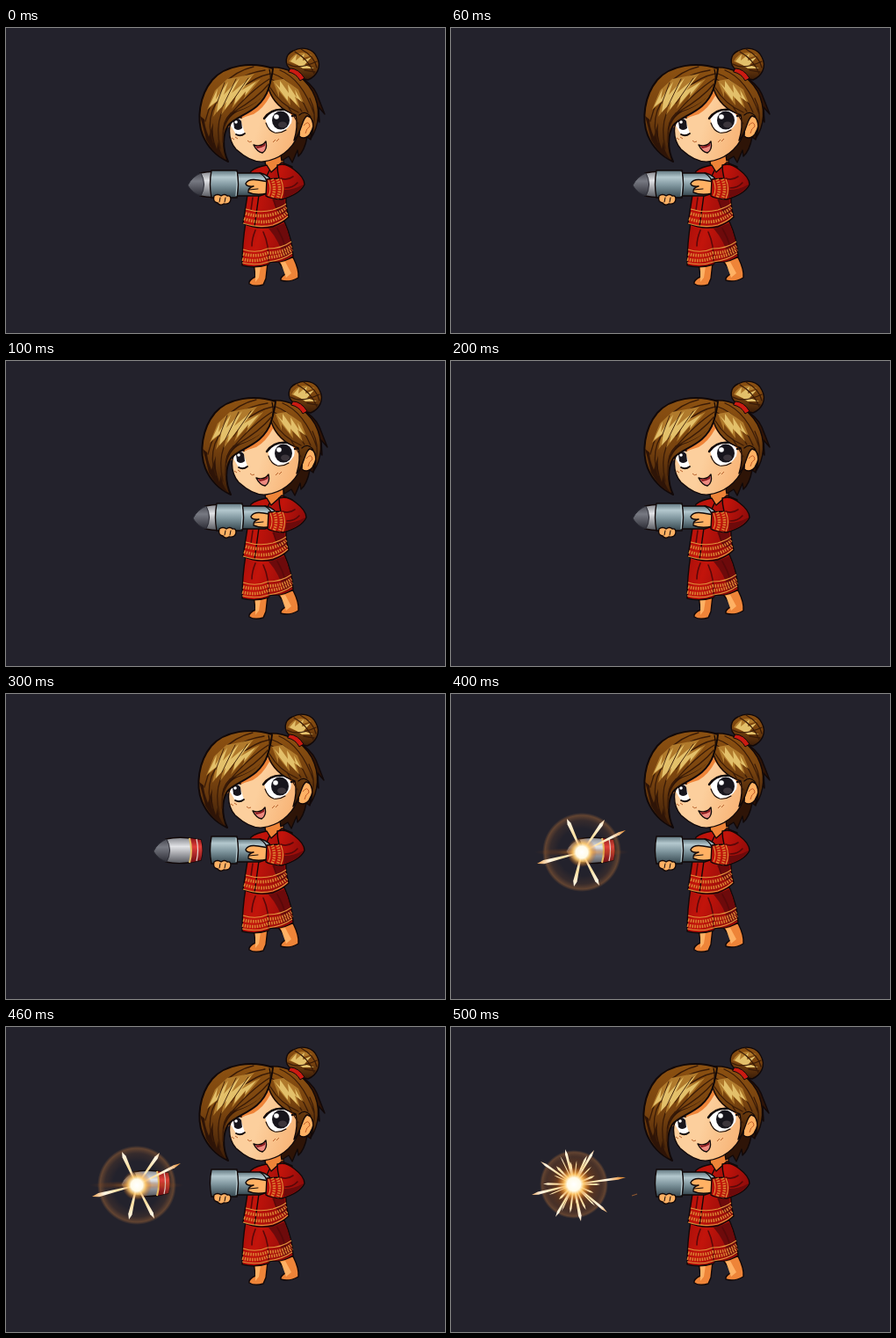
An HTML page that plays this animation: 500x347 px, repeating every 600 ms.

```html
<!DOCTYPE html>
<html lang="en">
<head>
<meta charset="utf-8">
<title>Rocket girl</title>
<style>
  html, body { margin: 0; width: 100%; height: 100%; overflow: hidden; background: #23222c; }
  svg { display: block; width: 100%; height: 100%; }
  .ink { stroke: #110808; stroke-width: 1.4; stroke-linejoin: round; stroke-linecap: round; }
  .line { fill: none; }
  .skin { fill: url(#skin); }
  .warm { fill: #ffb164; }
  .shade { fill: #ee8438; }
  .red { fill: url(#red); }
  .maroon { fill: #6d0a0b; }
  .hair { fill: url(#hair); }
  .dark { fill: #2e1407; }
  .strand { fill: none; stroke: #3a1b07; stroke-width: 1.3; stroke-linecap: round; }
  .shine { fill: #e3c06a; }
  .shine2 { fill: #b07a2c; }
  .fold { fill: none; stroke: #590809; stroke-width: 1.6; stroke-linecap: round; }
  .gold { fill: none; stroke: #e3923c; stroke-width: 1.1; }
  .dots { stroke-width: 3.6; stroke-dasharray: 1.5 1.3; stroke: #dc8433; }
</style>
</head>
<body>
<svg viewBox="0 0 500 347">
  <defs>
    <linearGradient id="skin" x1="0" y1="0" x2="1" y2=".3">
      <stop offset=".5" stop-color="#fccf9d"/><stop offset="1" stop-color="#f8b578"/>
    </linearGradient>
    <linearGradient id="hair" x1="0" y1="0" x2="0" y2="1">
      <stop offset="0" stop-color="#8c5111"/><stop offset=".5" stop-color="#78430f"/><stop offset="1" stop-color="#3a1c08"/>
    </linearGradient>
    <linearGradient id="red" x1="0" y1="0" x2="1" y2=".3">
      <stop offset="0" stop-color="#a90f0a"/><stop offset=".4" stop-color="#c3140b"/><stop offset="1" stop-color="#940c0a"/>
    </linearGradient>
    <linearGradient id="steel" x1="0" y1="0" x2="0" y2="1">
      <stop offset="0" stop-color="#5d737c"/><stop offset=".25" stop-color="#b4c8ce"/>
      <stop offset=".55" stop-color="#7f969e"/><stop offset="1" stop-color="#35464e"/>
    </linearGradient>
    <linearGradient id="pale" x1="0" y1="0" x2="0" y2="1">
      <stop offset="0" stop-color="#85878d"/><stop offset=".35" stop-color="#e2e3e6"/><stop offset="1" stop-color="#55575e"/>
    </linearGradient>
    <linearGradient id="nose" x1="0" y1="0" x2="0" y2="1">
      <stop offset="0" stop-color="#4a4b54"/><stop offset=".35" stop-color="#777982"/><stop offset="1" stop-color="#2e2e37"/>
    </linearGradient>
    <linearGradient id="band" x1="0" y1="0" x2="0" y2="1">
      <stop offset="0" stop-color="#8e1519"/><stop offset=".35" stop-color="#e2403a"/><stop offset="1" stop-color="#6f0d13"/>
    </linearGradient>
    <radialGradient id="glow">
      <stop offset="0" stop-color="#fff"/><stop offset=".4" stop-color="#fffbe8"/>
      <stop offset=".6" stop-color="#ffc765" stop-opacity=".85"/><stop offset="1" stop-color="#c05a10" stop-opacity="0"/>
    </radialGradient>
    <radialGradient id="ray" gradientUnits="userSpaceOnUse" cx="0" cy="0" r="54">
      <stop offset=".1" stop-color="#fff"/><stop offset=".4" stop-color="#ffe0a0"/>
      <stop offset=".7" stop-color="#fff6e4"/><stop offset="1" stop-color="#e8953f"/>
    </radialGradient>
    <radialGradient id="ring">
      <stop offset=".6" stop-color="#b0622a" stop-opacity="0"/><stop offset=".8" stop-color="#a4602e" stop-opacity=".14"/>
      <stop offset=".93" stop-color="#b87238" stop-opacity=".42"/><stop offset="1" stop-color="#b87238" stop-opacity="0"/>
    </radialGradient>
    <radialGradient id="fire">
      <stop offset=".2" stop-color="#ff9a24" stop-opacity=".9"/><stop offset=".55" stop-color="#b5560f" stop-opacity=".45"/>
      <stop offset="1" stop-color="#a04a10" stop-opacity="0"/>
    </radialGradient>
  </defs>

  <!-- legs and trousers -->
  <path class="ink shade" d="M282 267L284 283Q276 287 277 291Q283 295 293 292L296 285L298 267Z"/>
  <path class="ink shade" d="M309 264L320 279Q312 283 313 287Q323 290 333 284Q334 275 327 261Z"/>
  <path class="warm" d="M284 271H290L288 284L284 289ZM313 267L318 266L325 279L319 284Z"/>
  <path class="ink red" d="M273 221Q269 245 269 270Q284 274 299 269L301 266Q315 268 327 260Q326 240 317 220Z"/>
  <path class="maroon" d="M299 228Q308 226 317 222Q325 241 326 258L316 261Q312 243 299 228Z"/>
  <path class="fold" d="M293 232Q300 247 299 268M284 230Q280 240 280 248M309 228Q316 240 318 250"/>
  <path class="gold" d="M270 252Q285 257 298 251Q314 251 325 243M269 267Q285 271 299 266Q315 264 326 256"/>
  <path class="gold dots" d="M270 257Q285 261 298 256Q315 256 325 248M269 263Q285 267 299 261Q315 260 326 252"/>

  <!-- torso -->
  <path class="ink shade" d="M294 145L296 158L302 166L316 156V140Z"/>
  <path class="ink red" d="M297 156Q285 158 279 163Q275 176 275 190L270 222Q287 230 304 226Q315 222 322 215Q317 199 320 181L326 158L314 153Q308 159 302 164Z"/>
  <path class="maroon" d="M303 195L317 193Q317 204 321 213L312 211Z"/>
  <path class="fold" d="M305 195Q306 203 311 210M281 193L279 207"/>
  <path class="line ink" d="M300 162Q293 176 288 190L283 226"/>
  <path class="gold" d="M273 206Q289 211 304 207Q314 204 319 200M270 222Q288 228 304 224Q315 220 321 214"/>
  <path class="gold dots" d="M273 211Q289 216 304 212Q315 209 319 204M271 217Q289 223 304 219Q315 215 320 210"/>

  <!-- rocket -->
  <g id="shell">
    <path class="ink" fill="url(#pale)" d="M182 165Q200 161 222 166Q225 178 222 189Q201 195 182 191Z"/>
    <path fill="url(#band)" d="M209 164L222 166Q225 178 222 189L209 192Q213 178 209 164Z"/>
    <path class="line" stroke="#e6bd64" stroke-width="2" d="M209 164Q213 178 209 192"/>
    <path class="line" stroke="#e9d9d0" stroke-width="1.2" d="M217 165Q220 178 217 190"/>
    <path fill="url(#nose)" stroke="#2a2a33" d="M168 179Q173 169 183 165Q190 178 183 191Q173 188 168 179Z"/>
  </g>

  <!-- launcher, hands and sleeve -->
  <g id="gun">
    <path class="ink" fill="url(#steel)" d="M262 165H290Q302 168 304 178Q301 188 289 191H262Z"/>
    <path class="line ink" d="M289 165Q298 170 298 180"/>
    <path class="ink" fill="url(#steel)" d="M234 162H263Q266 178 263 193H234Q231 178 234 162Z"/>
    <path class="line" stroke="#c3d5d9" stroke-width="1" d="M262 164Q264 178 262 191"/>
    <path class="ink warm" d="M237 191Q241 188 245 191Q249 188 252 191Q256 190 256 195Q255 201 248 200Q244 203 241 199Q235 198 237 191Z"/>
    <path class="line ink" d="M244 193L243 198M250 193L249 198" style="stroke-width:1"/>
    <path class="ink warm" d="M299 175L287 173Q276 171 273 177Q274 181 282 180Q275 182 276 187Q285 191 298 188Z"/>
    <path class="line ink" d="M277 184L287 183" style="stroke-width:1"/>
  </g>
  <g id="sleeve">
    <path class="ink red" d="M309 156Q319 153 328 161Q340 170 340 178Q335 189 314 195Q300 194 296 191L297 172L311 171Q309 163 309 156Z"/>
    <path class="maroon" d="M316 193Q333 189 339 178Q328 184 317 184Z"/>
    <path class="fold" d="M313 171Q320 174 327 169M318 182Q327 182 332 176"/>
    <path class="gold" d="M299 173Q303 183 299 191M313 172Q318 183 313 194"/>
    <path class="gold dots" d="M303 172Q308 183 303 193M309 172Q314 183 309 194"/>
  </g>

  <!-- head -->
  <g id="head">
    <path class="ink dark" d="M298 47Q342 50 354 75L363 98L356 90L357 107L350 97L347 127L343 124Q340 140 333 146L332 139L326 153L322 146L314 151L302 80Z"/>
    <path class="ink skin" d="M262 86C251 112 253 128 262 138C272 147 283 153 293 152C310 150 326 139 333 121L337 88Q300 56 262 86Z"/>
    <path class="shade" d="M299 68Q289 90 262 98L250 116Q262 103 282 98Q293 92 301 77Q311 93 332 103L331 96Q309 88 299 68Z"/>
    <path class="ink warm" d="M335 106Q341 97 348 102Q353 110 346 121Q340 128 334 123Z"/>
    <path class="line" stroke="#c4602a" d="M339 111Q345 104 346 112Q342 114 341 120"/>

    <path fill="#fff" d="M256 111Q259 101 266 101L272 120Q266 123 262 121Z"/>
    <path fill="#17151c" d="M259 106Q264 100 268 106L269 114Q264 118 260 114Z"/>
    <circle cx="262" cy="107" r="1.8" fill="#fff"/>
    <path class="line ink" d="M255 111Q258 99 268 102M262 121Q267 124 272 120" style="stroke-width:1.8"/>
    <path fill="#fff" d="M295 101Q304 92 318 94Q328 97 325 108Q319 119 306 119Q297 115 295 101Z"/>
    <ellipse cx="313" cy="105" rx="10" ry="10.5" fill="#17151c"/>
    <ellipse cx="315" cy="110" rx="5" ry="3.5" fill="#3b353b"/>
    <circle cx="308" cy="101" r="2.8" fill="#fff"/>
    <path class="line ink" d="M294 103Q302 91 318 93Q325 97 334 95M326 100L332 99" style="stroke-width:2.4"/>
    <path class="line ink" d="M296 108Q299 117 306 119Q313 120 319 116" style="stroke-width:1.1"/>
    <path class="line" stroke="#b9632e" d="M275 128Q277 131 280 129M257 125L260 127M261 124L264 126M304 130L307 127M308 129L311 126"/>
    <path class="ink" fill="#ee8a80" d="M282 133Q291 136 296 129Q298 139 292 142Q286 141 282 133Z"/>
    <path fill="#8d1c20" d="M284 134Q291 136 295 131L295 134Q290 137 286 137Z"/>

    <path class="ink hair" d="M298 45C319 43 338 53 349 72C359 91 357 111 347 126C352 113 350 101 343 100C337 102 337 119 328 128Q333 112 330 99C315 94 304 84 299 69Z"/>
    <path class="strand" d="M301 68Q312 87 333 96M302 58Q318 66 337 95M304 52Q328 60 344 96M312 48Q337 58 351 98M321 89L333 109M346 80Q354 96 350 112"/>
    <path class="ink hair" style="stroke-width:2" d="M304 46C280 38 250 42 235 59C220 77 217 104 224 122C231 139 242 147 253 152C246 137 247 121 253 111C261 99 290 97 299 69Q303 56 304 46Z"/>
    <path class="dark" d="M221 100Q227 122 228 127Q237 144 250 150Q242 140 242 129L240 138Q234 122 236 108L231 124Q226 112 226 104Z"/>
    <path class="dark" d="M299 69Q288 87 264 95Q250 102 247 122Q245 107 256 96Q286 90 299 69Z"/>
    <path class="strand" d="M301 52Q268 59 245 98Q239 114 244 137M300 58Q279 71 254 100Q246 110 247 130M299 64Q286 80 260 95M295 48Q252 54 235 94Q229 112 236 130M282 44Q240 54 227 106"/>
    <path class="shine2" d="M229 93L238 71L252 58L283 52L271 66L290 58L270 82L276 69L257 92L262 77L245 99L249 84L236 101L240 84Z"/>
    <path class="shine" d="M231 90L241 69L239 81L253 61L248 76L266 57L257 74L280 55L268 71L285 61L272 77L273 72L260 87L262 77L249 93L251 84L240 96L242 82Z"/>
    <path class="strand" d="M249 62L240 86M262 58L247 89M276 57L256 86" style="stroke-width:.9"/>
    <path class="shine2" d="M304 60L316 58L333 70L339 85L331 79L335 92L323 79L324 88L311 72L311 79Z"/>
    <path class="shine" d="M306 62L312 68L312 60L322 74L321 64L331 79L329 70L337 84L329 78L332 88L321 77L321 83L312 71Z"/>
    <path class="line ink" d="M299 69Q303 58 300 47M334 99Q341 93 347 101" style="stroke-width:1.2"/>

    <path class="ink hair" d="M325 48C316 41 318 30 327 26C338 20 350 24 354 33C360 44 354 55 344 59Q334 58 325 48Z"/>
    <path class="shine2" d="M322 38Q328 27 339 28L349 31L336 35L332 42Z"/>
    <path class="shine" d="M324 38L331 30L330 37L340 29L338 37L348 33L340 42L351 46L338 46L332 42Z"/>
    <path class="strand" d="M321 41Q333 48 354 38M329 27Q345 36 351 52M336 24Q351 32 354 45M340 48L352 50"/>
    <path class="ink" fill="#cb1b12" d="M324 46Q333 46 340 57L335 60Q331 52 322 50Z" style="stroke-width:1"/>
  </g>

  <g id="flash" transform="translate(149 180)">
    <circle r="45" fill="url(#ring)"/>
    <ellipse rx="54" ry="5" fill="url(#fire)" opacity=".5"/>
  </g>
  <g id="blast" transform="translate(140 179)">
    <circle r="39" fill="url(#ring)"/>
    <circle r="37" fill="url(#fire)"/>
  </g>
  <path id="spark" stroke="#8d5731" stroke-width="1.2" d="M206 192L212 190"/>
</svg>
<script>
const $ = id => document.getElementById(id);

function add(group, tag, attrs) {
  const el = document.createElementNS("http://www.w3.org/2000/svg", tag);
  for (const name in attrs) el.setAttribute(name, attrs[name]);
  group.append(el);
}

// Each ray is a spike that widens outward: tip x, tip y, half width.
function addBurst(group, rays, core) {
  for (const [x, y, w] of rays) {
    const len = Math.hypot(x, y), angle = Math.atan2(y, x) * 180 / Math.PI;
    add(group, "path", {
      d: `M0 -.6L${len * .85} ${-w}L${len} 0L${len * .85} ${w}L0 .6Z`,
      transform: `rotate(${angle})`,
      fill: "url(#ray)"
    });
  }
  add(group, "circle", { r: core, fill: "url(#glow)" });
}

addBurst($("flash"), [[-17, -38, 2.2], [26, -37, 2], [-9, 39, 2.2], [20, 38, 2],
  [-51, 13, 2.2], [50, -25, 1.6]], 17);

const spikes = [[-48, 12, 1.7], [59, -8, 1.5], [-10, -40, 1.5], [23, -39, 1.5],
  [8, 42, 1.8], [-21, 37, 1.4], [38, 32, 1.5], [-38, -26, 1.4]];
for (let i = 0; i < 18; i++) {
  const a = i * .349 + .1 * Math.sin(i * 7), len = 30 + 6 * Math.sin(i * 4.3);
  spikes.push([len * Math.cos(a), len * Math.sin(a), .9 + .4 * Math.sin(i * 3)]);
}
addBurst($("blast"), spikes, 19);

// Held poses, 100 ms each: offsets of head, launcher and rocket.
const poses = [
  { head: 0, gun: 0, shell: 39 },
  { head: 3, gun: 6, shell: 45 },
  { head: 0, gun: 0, shell: 39 },
  { head: -1, gun: 0, shell: 0 },
  { head: 0, gun: 0, shell: -37, show: "flash" },
  { head: -1, gun: 0, show: "blast" }
];

const move = (id, x) => $(id).setAttribute("transform", `translate(${x} 0)`);
const toggle = (id, on) => { $(id).style.display = on ? "" : "none"; };

function draw(time) {
  const pose = poses[Math.floor(time % 600 / 100)];
  move("head", pose.head);
  move("gun", pose.gun);
  move("sleeve", pose.gun / 3);
  move("shell", pose.shell ?? 0);
  toggle("shell", pose.shell !== undefined);
  toggle("flash", pose.show === "flash");
  toggle("blast", pose.show === "blast");
  toggle("spark", pose.show === "blast");
}

const start = performance.now();
function tick() {
  draw(performance.now() - start);
  requestAnimationFrame(tick);
}
tick();
</script>
</body>
</html>
```
